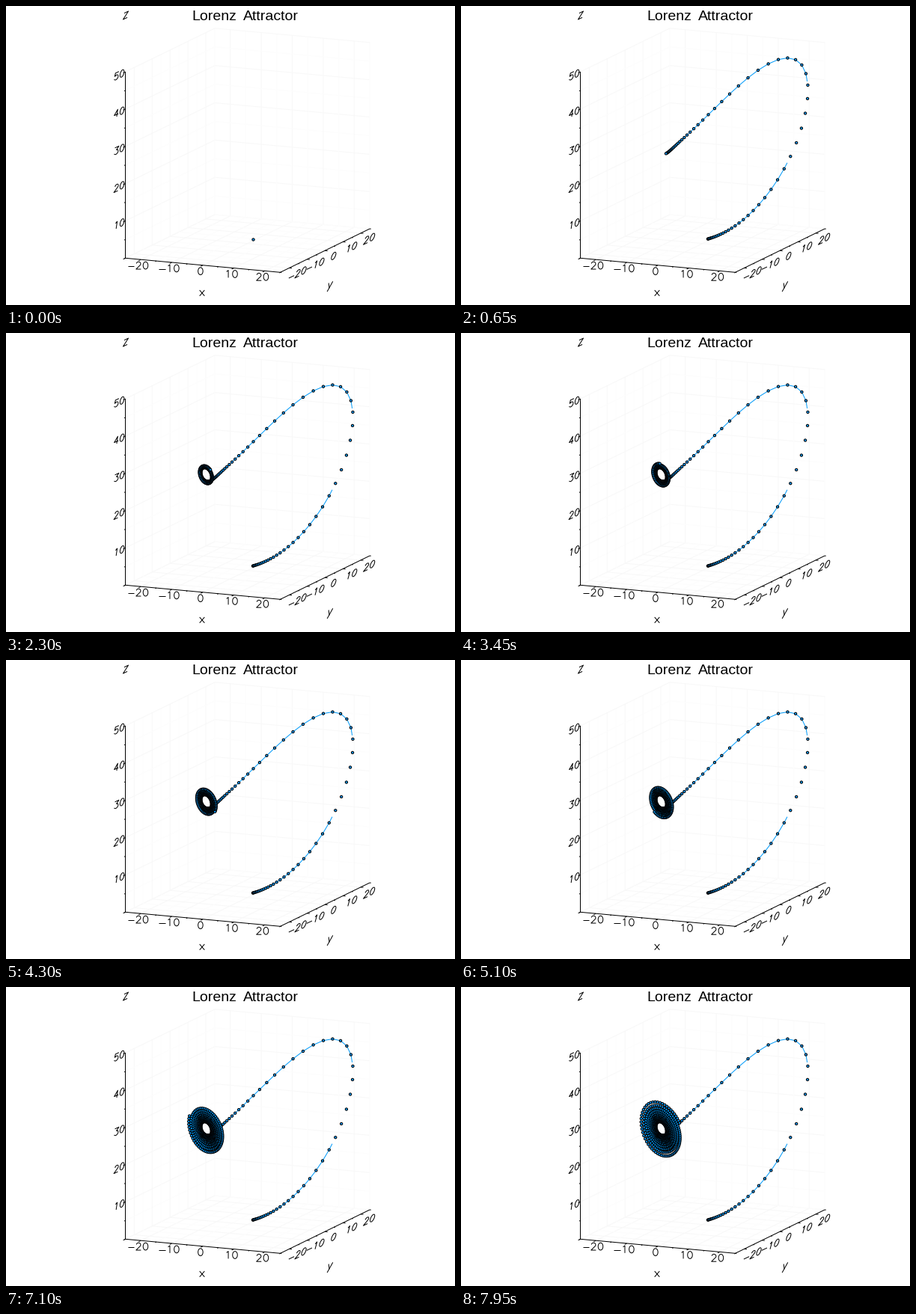
Write a matplotlib script that moves like this. It is 600 by 400 pixels and loops after 8000 ms.

```python
import numpy as np
import matplotlib.pyplot as plt
from matplotlib.animation import FuncAnimation

W, H, DPI = 600, 400, 100
FRAMES, STEP_MS, PER_FRAME = 160, 50, 5
PX = 72 / DPI  # one pixel in points
BLUE = "#009afa"

ORIGIN = np.array([159.5, 337.3])
AXES = np.array([[4.14, 0.38], [2.39, -1.165], [0, -4.985]])


def project(p):
    return ORIGIN + (np.asarray(p, float) + [25, 25, 0]) @ AXES


def lorenz(n, dt=0.01, sigma=10, rho=28, beta=8 / 3):
    x = y = z = 1.0
    path = []
    for _ in range(n):
        x += dt * sigma * (y - x)
        y += dt * (x * (rho - z) - y)
        z += dt * (x * y - beta * z)
        path.append((x, y, z))
    return np.array(path)


def clipped(path, top=25):
    """Path without the part beyond y = top, and its length at each point."""
    out, ends = [path[0]], [1]
    for a, b in zip(path, path[1:]):
        if (a[1] > top) != (b[1] > top):
            cut = a + (b - a) * (top - a[1]) / (b[1] - a[1])
            out += [cut, [np.nan] * 3] if b[1] > top else [cut]
        if b[1] <= top:
            out.append(b)
        ends.append(len(out))
    return np.array(out), ends


def bowl(cy, rx, ry, start, end):
    t = np.radians(np.linspace(start, end, 18))
    return list(zip(10 + rx * np.cos(t), cy + ry * np.sin(t)))


# stroke glyphs in a cell 20 wide and 21 high
CELL_W, CELL_H = 20, 21
tl, tr, bl, br = (3, 21), (17, 21), (3, 0), (17, 0)
GLYPHS = {
    "0": [bowl(10.5, 7, 10.5, 0, 360)],
    "1": [[(6, 17), (11, 21), (11, 0)]],
    "2": [bowl(15, 6, 6, 170, -30) + [bl, br]],
    "3": [[tl, tr, (10, 13)] + bowl(6.5, 7, 6.5, 75, -155)],
    "4": [[(13, 0), (13, 21), (3, 7), (18, 7)]],
    "5": [[tr, (5, 21), (4, 12)] + bowl(7, 7, 7, 130, -155)],
    "-": [[(0, 9), (18, 9)]],
    "x": [[tl, br], [tr, bl]],
    "y": [[tl, (10, 0)], [tr, (5, -10)]],
    "z": [[tl, tr, bl, br]],
}

fig = plt.figure(figsize=(W / DPI, H / DPI), dpi=DPI, facecolor="white")
ax = fig.add_axes([0, 0, 1, 1])
ax.set(xlim=(0, W), ylim=(H, 0))
ax.axis("off")


def stroke(pts, color="black"):
    ax.plot(*np.transpose(pts), color=color, lw=PX,
            solid_capstyle="butt", solid_joinstyle="round")


def label(text, center, right, up):
    pen = -CELL_W * len(text) / 2
    for c in text:
        for s in GLYPHS[c]:
            cell = np.array(s) + [pen, -CELL_H / 2]
            stroke(cell @ [right, up] + center)
        pen += CELL_W


def grid_line(*corners, major):
    stroke(project(corners), "#f8f8f8" if major else "#fdfdfd")


ticks = range(-25, 26, 5)
for v in ticks:
    major, z = v % 10 == 0, v + 25
    grid_line((v, -25, 0), (v, 25, 0), (v, 25, 50), major=major)
    grid_line((25, v, 0), (-25, v, 0), (-25, v, 50), major=major)
    grid_line((-25, -25, z), (-25, 25, z), (25, 25, z), major=not major)

stroke(project([(-25, -25, 50), (-25, -25, 0), (25, -25, 0), (25, 25, 0)]))

FLAT = [0.47, 0], [0, -0.47]
DEPTH = [0.40, -0.19], [0.13, -0.47]
SIDE = [0.38, -0.18], [0.07, -0.47]

for v in ticks:
    major, z = v % 10 == 0, v + 25
    long, short = (1.2, 0.6) if major else (0.6, 1.2)
    stroke(project([(v, -25, 0), (v, -25 - long, 0)]))
    stroke(project([(25, v, 0), (25 + long * 0.7, v, 0)]))
    stroke(project([(-25, -25, z), (-25, -25 - short, z)]))
    if major:
        label(str(v), project((v, -25, 0)) + [-3.1, 7.9], *FLAT)
        label(str(v), project((25, v, 0)) + [11.6, 7.2], *DEPTH)
    elif z:
        label(str(z), project((-25, -25, z)) + [-8.2, 4], *SIDE)

label("x", (262, 384), [0.47, 0], [0, -0.37])
label("y", (433, 373.5), [0.40, -0.16], [0.09, -0.38])
label("z", (160, 12.5), [0.40, -0.19], [0.07, -0.40])

title = dict(y=19, family="Liberation Sans", size=14, va="baseline")
ax.text(x=248.5, s="Lorenz", ha="left", **title)
ax.text(x=390.5, s="Attractor", ha="right", **title)

path = lorenz(PER_FRAME * (FRAMES - 1) + 1)
dots = project(path)
visible, ends = clipped(path)
curve = project(visible)

line, = ax.plot([], [], color=BLUE, lw=PX, zorder=5)
marks = ax.scatter([], [], marker="o", facecolor=BLUE, edgecolor="black",
                   linewidth=PX, zorder=6)
DOT_AREA = (3.3 * PX) ** 2


def draw(i):
    n = PER_FRAME * i + 1
    line.set_data(*curve[:ends[n - 1]].T)
    marks.set_offsets(dots[:n])
    marks.set_sizes(np.full(n, DOT_AREA))  # one size per dot keeps subpixel places
    return line, marks


anim = FuncAnimation(fig, draw, frames=FRAMES, interval=STEP_MS,
                     repeat=True, repeat_delay=0, blit=False)
plt.show()
```
